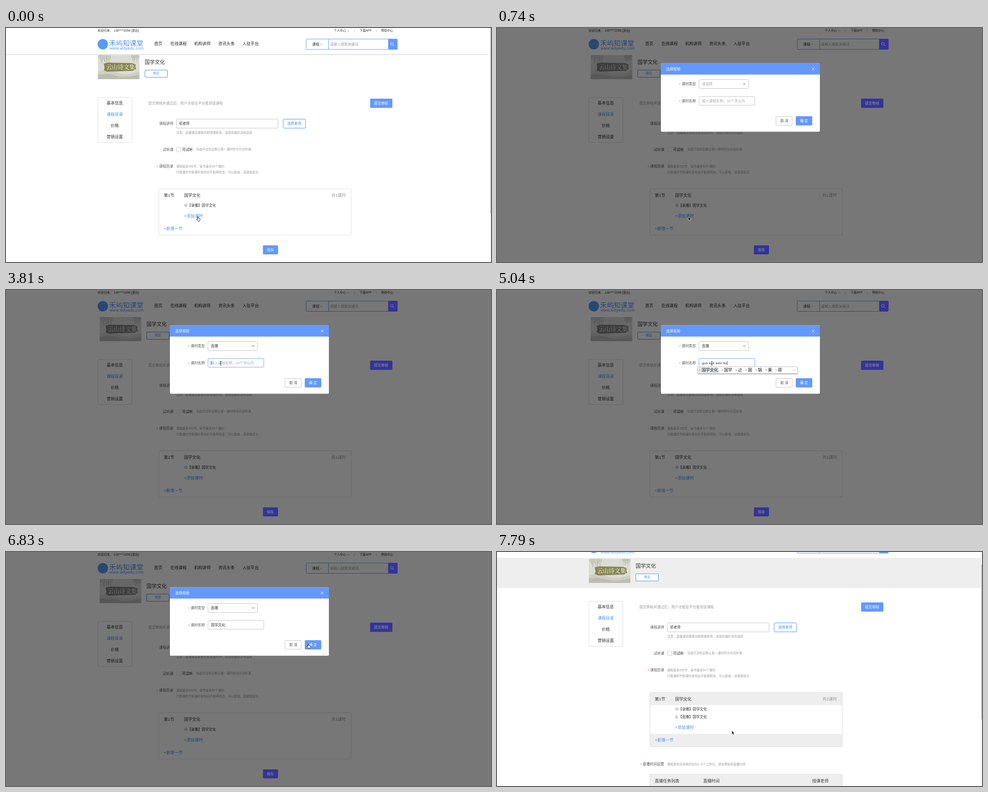
Recreate the animation shown at these times as an HTML page. Size 1077 px wide and 520 px high, loop 8 s.

```html
<!DOCTYPE html>
<html lang="zh-CN">
<head>
<meta charset="utf-8">
<title>课程目录</title>
<style>
html, body { margin: 0; width: 100%; height: 100%; overflow: hidden; background: #fff; }
svg { display: block; width: 100%; height: 100%; }
text { font-family: "Liberation Sans", "Noto Sans CJK SC", "Noto Sans CJK", sans-serif; white-space: pre; }
</style>
</head>
<body>
<svg id="stage" viewBox="0 0 1077 520" xmlns="http://www.w3.org/2000/svg"></svg>
<script>
const LOOP = 8000;
const BLUE = '#6398ff', LINK = '#4a8ef5', INK = '#333', LABEL = '#555', GREY = '#999';
const LINE = '#ddd', FIELD = '#c4c4c4', BAND = '#eee';
const S = 6.75, M = 7.9, L = 9.05;
const stage = document.getElementById('stage');
const pen = document.createElement('canvas').getContext('2d');
pen.font = `${M}px "Liberation Sans", "Noto Sans CJK SC", sans-serif`;

const ticks = [
  [0, 0, 1], [500, 980, 3], [1240, 1560, 4], [1740, 2440, 9], [2700, 3420, 9],
  [3720, 3890, 3], [4220, 4220, 1], [4700, 5300, 8], [5720, 6390, 9],
  [6570, 6910, 5], [7150, 7380, 2], [7620, 7790, 3]
].flatMap(([a, b, n]) => Array.from({ length: n }, (_, i) =>
  n < 2 ? a : Math.floor((a + (b - a) * i / (n - 1)) / 10) * 10));

// Pointer path: time, x, y, shape
const path = [
  [0, 427, 424, 'hand'], [500, 427, 424, 'hand'], [740, 425, 419.5, 'arrow'],
  [980, 428, 393, 'arrow'], [1240, 440, 350, 'arrow'], [1560, 505, 126, 'hand'],
  [1740, 505, 126, 'hand'], [2440, 480, 153, 'hand'], [2880, 480, 153, 'hand'],
  [3420, 477, 163, 'beam'], [5630, 477, 163, 'beam'], [5720, 489, 168, 'arrow'],
  [6200, 681, 213, 'hand'], [6390, 676, 211, 'hand'], [6570, 672, 209, 'hand'],
  [6910, 672, 209, 'hand'], [7150, 704, 203, 'arrow'], [7380, 524, 383, 'arrow'],
  [7620, 521.5, 397, 'arrow'], [LOOP, 521.5, 397, 'arrow']
];

const clamp = v => Math.max(0, Math.min(1, v));
const ramp = (t, a, b) => clamp((t - a) / (b - a));

function text(x, y, s, size = M, fill = INK, extra = '') {
  return `<text x="${x}" y="${y + size * .37}" font-size="${size}" fill="${fill}" ${extra}>${s}</text>`;
}
const mid = (x, y, s, size, fill, extra = '') => text(x, y, s, size, fill, 'text-anchor="middle" ' + extra);
function box(x, y, w, h, fill = 'none', stroke = 'none', r = 0, extra = '') {
  return `<rect x="${x}" y="${y}" width="${w}" height="${h}" rx="${r}" fill="${fill}" stroke="${stroke}" ${extra}/>`;
}
const stroke = (d, color, w = 1) => `<path d="${d}" fill="none" stroke="${color}" stroke-width="${w}"/>`;
const chevron = (x, y, color = '#777') => stroke(`M${x - 2.5} ${y - 1.2}l2.5 2.5l2.5 -2.5`, color, .7);
const star = (x, y, color = '#f04848') => text(x, y + .8, '*', M, color);
const group = (attrs, body) => `<g ${attrs}>${body}</g>`;
const veil = opacity => box(0, 0, 1077, 520, '#000', 'none', 0, `opacity="${opacity}"`);

function header() {
  return text(203.5, 6, '欢迎归来， 136****2058 [退出]', S) +
    text(728, 6, '个人中心', S) + chevron(760, 6) + text(772.5, 6, '|', S, GREY) +
    text(785, 6, '下载APP', S) + text(821.5, 6, '|', S, GREY) + text(833, 6, '帮助中心', S) +
    `<circle cx="215" cy="36" r="11.5" fill="#559bf8"/>` +
    text(229, 33, '禾屿知课堂', 15.2, '#4f92f5', 'font-weight="500"') +
    text(230, 44.5, 'www.wdyedu.com', 9, '#4f92f5', 'letter-spacing=".27"') +
    [[329, '首页'], [365, '在线课程'], [418, '机构讲师'], [471.5, '资讯头条'], [525, '入驻平台']]
      .map(([x, s]) => text(x, 35, s, L, '#222', 'font-weight="500"')).join('') +
    box(666.5, 24.5, 202, 23, '#fff', BLUE, 2) + stroke('M716.5 24.5v23', BLUE) +
    text(680, 36, '课程', M, '#222') + chevron(700, 36) +
    text(719.5, 36, '请输入搜索关键词', M, GREY);
}

// Solid buttons lie over the veil and have their own dimmed colours.
function buttons(t, dim) {
  const fill = dim ? '#333399' : BLUE, ink = dim ? '#999' : '#fff';
  return box(848.5, 24, 21, 24, fill, 'none', 2) +
    `<circle cx="857" cy="35" r="3" fill="none" stroke="${ink}" stroke-width=".8"/>` +
    stroke('M859.3 37.3l3 3', ink, .8) +
    box(808.5, 157, 49.5, 20.5, fill, 'none', 2) + mid(833, 167, '提交审核', M, ink) +
    (t < 6910 ? box(570.5, 483, 33.5, 20, fill, 'none', 2) + mid(587, 493, '保存', M, ink) : '');
}

function thumb(dim) {
  let leaves = '';
  for (let i = 0; i < 9; i++) {
    leaves += stroke(`M${207 + i * 3} 60q${i % 3 - 1} 7 ${i % 2} ${8 + i * 5 % 13}`, '#94a27c', .9);
    leaves += stroke(`M${278 + i * 2} 60q2 6 ${i % 3} ${5 + i * 7 % 11}`, '#9aa688', .8);
  }
  return group(dim ? 'style="filter:grayscale(1)"' : '',
    box(204, 60, 92.5, 53.5, '#dcdcd6') +
    `<path d="M204 97q20 -7 40 2t52 -3v17.500h-92z" fill="#cfcec6"/>
     <path d="M204 104q24 -4 40 2t52 -2v9.500h-92z" fill="#bdbcb0"/>
     <path d="M217 79l9 -2 54 1 8 3 -1 5 2 5 -7 4 -57 2 -8 -3 2 -6z" fill="#86864f"/>` + leaves +
    mid(254.5, 86, '云山诗文集', 12.8, '#fff', 'style="font-family:\'Noto Serif\',\'Noto Serif CJK SC\',\'Noto Sans CJK SC\',serif"'));
}

function lesson(y, kind) {
  const icon = kind === '录播'
    ? `<circle cx="399.500" cy="${y}" r="3" fill="none" stroke="#777" stroke-width=".7"/><circle cx="399.500" cy="${y}" r="1" fill="#777"/>`
    : stroke(`M397 ${y - 2.5}l2.500 -.5l1.500 3.500l-3.500 1.500zM401 ${y + 2.5}h1.500M396.500 ${y + 2.5}h4`, '#777', .7);
  return icon + text(403, y, `【${kind}】国学文化`, M);
}

function page(t, dim) {
  const added = t >= 6910, open = t >= 500 && t < 7150, bands = t >= 7620;
  const dy = added ? 17.5 : 0;
  let out = '';
  if (bands) {
    out += box(0, 58, 1074, 67, BAND) + box(339.5, 357.5, 427, 28, BAND) +
      box(339.5, 449, 427, 28, BAND) + box(339.5, 539, 427, 30, BAND);
  } else if (t >= 6910 && t < 7150) {
    out += `<path d="M0 58H1073V40H1077V61q0 4 -5 4H5q-5 0 -5 -4z" fill="#e9e9e9"/>`;
  } else if (!dim) {
    out += stroke('M2 58.500H1071', '#d9d9d9', 1.2) + stroke('M3 59.800H1070', '#f0f0f0', 1.4);
  }
  out += header();
  out += group(`transform="translate(${open ? 4 : 0} 0)"`, thumb(dim) +
    text(308, 75.5, '国学文化', 11.25) +
    box(308.5, 93.5, 50, 16, '#fff', LINK, 1.5) + mid(333.3, 100.5, '预览', S, LINK));

  out += box(204, 154.5, 75.5, 100, '#fff', LINE, 2) +
    ['基本信息', '课程目录', '价格', '营销设置']
      .map((s, i) => mid(241.5, 167 + i * 25, s, L, i === 1 ? LINK : INK)).join('');
  out += text(316, 167, '提交审核并通过后，用户才能在平台看到该课程', M, GREY);
  out += text(340, 212, '课程讲师', M, LABEL) + box(378.5, 202.5, 225.5, 20, '#fff', FIELD, 2) +
    text(384, 212, '祁老师') + box(615.5, 202.5, 49.5, 20, '#fff', LINK, 2) +
    mid(640, 212, '选择老师', M, LINK) +
    text(378, 233, '注意：直播课设置需关联授课老师，请提前做好讲师选择', S, GREY);
  out += text(348, 270, '试听课', M, LABEL) + box(378.5, 265, 10, 10, '#fff', dim ? '#eee' : FIELD, 2) +
    text(391, 270, '可试听', M, '#222') +
    text(422.5, 270, '勾选可试听后默认第一课时作为可试听课', S, GREY);
  out += star(334.5, 307) + text(340, 307, '课程目录', M, LABEL) +
    text(378, 307.5, '课程最多250节，每节最多50个课时;', S, GREY) +
    text(378, 320.5, '付费课的节和课时发布后不能再修改，可以新增，请谨慎填写;', S, GREY);

  out += box(339.5, 357.5, 427, 102.5 + dy, 'none', LINE, 2) +
    text(350.5, 371.5, '第1节', L) + text(395.5, 371.5, '国学文化', L) +
    text(722.5, 371.5, `共${added ? 2 : 1}课时`, L, GREY) + lesson(394, '录播') +
    (added ? lesson(411.5, '直播') : '') +
    text(395.5, 417.5 + dy, '+添加课时', L, LINK) + text(350.5, 445.5 + dy, '+新增一节', L, LINK);
  if (added) {
    out += star(318.5, 516) + text(323.5, 516, '直播时间设置', M, LABEL) +
      text(378, 516.5, '课程发布后审核时间为1~2个工作日，请合理安排直播时间', S, GREY) +
      box(339.5, 539, 427, 80, 'none', LINE, 2) +
      text(350.5, 553.5, '直播任务列表', L) + text(458, 553.5, '直播时间', L) + text(700, 553.5, '授课老师', L);
  }
  return out;
}

function dropdown(t) {
  const p = ramp(t, 1740, 2090) * (1 - ramp(t, 2880, 3150));
  if (!p) return '';
  const hover = t >= 2260;
  return group(`opacity="${p}" transform="translate(0 138) scale(1 ${p}) translate(0 -138)"`,
    box(449, 139, 110.5, 48.5, '#000', 'none', 2, 'opacity=".18"') +
    box(448.5, 138.5, 110, 47, '#fff', LINE, 2) +
    (hover ? box(449, 141.5, 109.5, 20.5, BAND) : '') +
    text(455, 151.5, '直播', S) + text(455, 171.5, '录播', S));
}

function ime(first) {
  let x = 449;
  let out = box(444.5, 171, 224, 17, '#000', 'none', 3, 'opacity=".18"') +
    box(445.5, 170.5, 222, 15, '#fff', '#aaa', 2, 'stroke-width=".8"') +
    box(447.5, 172.5, 7.5 + 9.1 * first.length, 11.5, '#eceef0', '#ccc', 1.5, 'stroke-width=".6"');
  [first, '国学', '过', '国', '锅', '果', '郭'].forEach((s, i) => {
    out += text(x, 178, i + 1, 6, '#777') + text(x + 5.5, 178, s, 9.1, '#111', 'font-weight="500"');
    x += 13 + 9.1 * s.length;
  });
  return out + chevron(659.5, 178);
}

function nameField(t) {
  const typed = ['g', 'guo', 'guo xue', 'guo xue wen', 'guo xue wen hu', 'guo xue wen hua', 'guo xue wen hua'];
  const step = ticks.filter(k => k >= 4700 && k <= t).length - 1;
  const value = t < 4700 ? '' : typed[step] || '国学文化';
  const focus = t >= 3720 && t < 6570;
  const caret = focus && (t < 4220 || t >= 4700);
  let out = box(448.5, 152.5, 124, 19, '#fff', focus ? '#6fa8fb' : FIELD, 2) +
    (value ? text(455, 162, value) : text(455, 162, '输入课程名称，20个字以内', M, '#a8a8a8'));
  if (caret) {
    const x = 455.5 + pen.measureText(value).width;
    out += stroke(`M${x} 157.500v9`, '#222', .8);
  }
  if (typed[step]) out += ime(step < 2 ? '国' : step < 4 ? '国学' : '国学文化');
  return out;
}

function modal(t) {
  const open = t >= 1740 && t < 3150, picked = t >= 2880;
  const tri = open ? 'M545.500 126.500l3 -3.500l3 3.500z' : 'M545.500 123l3.500 4l3.500 -4z';
  return box(364, 78.5, 353, 152, '#fff', 'none', 2) +
    `<path d="M364 103.500V80.500q0 -2 2 -2H715q2 0 2 2V103.500z" fill="${BLUE}"/>` +
    text(375.5, 91, '选择视频', M, '#fff', 'font-weight="500"') + stroke('M699 88l6 6m0 -6l-6 6', '#fff', .9) +
    star(404.5, 124.5) + text(410, 124.5, '课时类型', M, LABEL) +
    box(448.5, 114.5, 110, 20, '#fff', open ? '#8fb9f8' : FIELD, 2) +
    text(455, 124.5, picked ? '直播' : '请选择', M, picked ? INK : '#a8a8a8') +
    `<path d="${tri}" fill="#bbb"/>` +
    star(404.5, 162) + text(410, 162, '课时名称', M, LABEL) + nameField(t) +
    box(619.5, 196.5, 36, 19.5, '#fff', FIELD, 2) + mid(638, 206, '取 消', M, LABEL) +
    box(663.5, 196, 36.5, 20.5, BLUE, 'none', 2) + mid(681.7, 206, '确 定', M, '#fff') +
    dropdown(t);
}

// What is left of the dialog while it fades out
function ghost() {
  const c = '#d4d4d4';
  return box(364, 69.5, 353, 24.5, LINE, 'none', 2) +
    text(375.5, 81.5, '选择视频', M, '#f6f6f6', 'font-weight="600"') + stroke('M699 79l6 6m0 -6l-6 6', '#fff', .9) +
    stroke('M364.500 94v31M716.500 94v31M364.500 155v25M716.500 155v25', BAND) +
    star(404.5, 115, c) + text(410, 115, '课时类型', M, c) +
    box(448.5, 105.5, 110, 19.5, 'none', LINE, 2) + text(455, 115, '请选择', M, '#e0e0e0') +
    `<path d="M545.500 113.500l3.500 4l3.500 -4z" fill="${c}"/>` +
    star(404.5, 152.5, '#e2e2e2') + text(410, 152.5, '课时名称', M, '#e2e2e2') +
    text(455, 152.5, '输入课程名称，20个字以内', M, '#e8e8e8') +
    stroke('M448.500 155v5q0 2 2 2H570.500q2 0 2 -2v-5', LINE) +
    mid(638, 196.5, '取 消', M, c) + box(663.5, 186.5, 36.5, 20.5, BAND, 'none', 2) +
    mid(681.7, 196.5, '确 定', M, '#f6f6f6');
}

const shapes = {
  arrow: `<path d="M0 0V8.300L1.900 6.600L3.200 9.500L4.700 8.800L3.400 6H6z" fill="#111" stroke="#fff" stroke-width=".6"/>`,
  hand: `<path d="M-1.700 1.200V-4q0 -1 .8 -1t.8 1V-1.600q.9 -.6 1.500 .2q.9 -.4 1.300 .4q1.200 -.2 1.200 1V2.200q0 1.300 -.8 2.200V5.200H-1.200V4.400Q-2.600 3 -3.600 1.300Q-4 .3 -3.300 .1Q-2.600 0 -1.700 1.200z" fill="#fff" stroke="#111" stroke-width=".9"/>`,
  beam: stroke('M-1.800 -4.500q1.800 0 1.800 1.200V3.300q0 1.200 -1.800 1.200M1.800 -4.500q-1.800 0 -1.800 1.200M0 3.300q0 1.200 1.800 1.200M-1.200 1h2.400', '#222', .8)
};

function pointer(t) {
  const i = path.findIndex(k => k[0] > t) - 1;
  const a = path[i], b = path[i + 1];
  const p = ramp(t, a[0], b[0]);
  const at = n => a[n] + (b[n] - a[n]) * p;
  return group(`transform="translate(${at(1)} ${at(2)})"`, shapes[a[3]]);
}

function draw(t) {
  const dim = t >= 740 && t < 6910, opening = t >= 500 && t < 740;
  const scroll = 45 * (t < 7620 ? 0 : t < 7700 ? .15 : t < 7790 ? .6 : 1);
  const scrolled = body => group(`transform="translate(0 ${-scroll})"`, body);
  let out = box(0, 0, 1077, 520, '#fff') + scrolled(page(t, dim)) +
    (dim ? veil(.533) : '') + scrolled(buttons(t, dim));
  if (t < 500 || t >= 7150) {
    const [y, h] = t < 500 ? [0, 412] : [scroll * 28 / 45, 344];
    out += box(1074, 0, 3, 520, '#fafafa') + stroke('M1074.500 0V520', '#ececec', .7) +
      box(1075.8, y, 1.2, h, '#a8a8a8', 'none', .6);
  }
  if (dim) out += modal(t);
  if (opening) out += veil(.25) + group('opacity=".5" transform="translate(0 -9.500)"', modal(t));
  if (t >= 6910 && t < 7150) out += ghost();
  stage.innerHTML = out + pointer(t);
}

let shown = -1;
function frame() {
  const t = performance.now() % LOOP;
  const tick = ticks.filter(k => k <= t).pop();
  if (tick !== shown) draw(shown = tick);
  requestAnimationFrame(frame);
}
frame();
</script>
</body>
</html>
```
